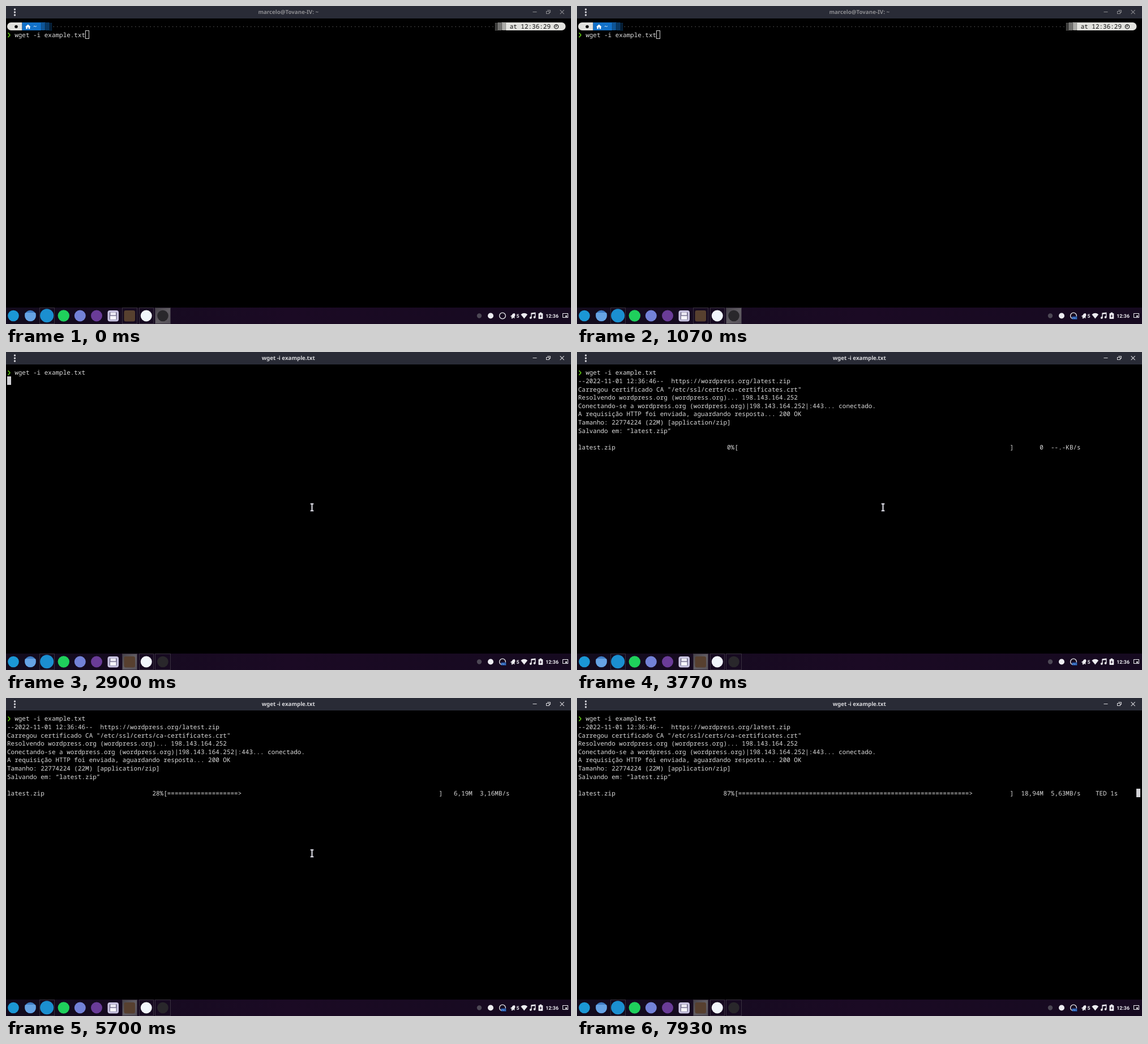
An HTML page with a canvas for the animation above (8 s loop, 998x561 px).

```html
<!DOCTYPE html>
<html lang="pt">
<head>
<meta charset="utf-8">
<title>Terminal</title>
<style>
html, body { margin: 0; width: 100%; height: 100%; overflow: hidden; background: #000; }
canvas { display: block; }
</style>
</head>
<body>
<canvas id="stage" width="998" height="561"></canvas>
<script>
const c = document.getElementById('stage').getContext('2d');
c.textRendering = 'geometricPrecision';
const LOOP = 8000, CELL = 6.575, ROW = 14.65;
const MONO = '10.958px "Noto Sans Mono", monospace';
const INK = '#dcdcdc', PALE = '#e2e2de', BLUE = '#1271c9';
const FOCUS = 1800, ENTER = 2730, SENT = 3770, FIRST = 4200, STEP = 205.8, TOTAL = 21.72;
const SHOW = 1300, HIDE = 6470; // pointer hides after resting

const colX = n => 2 + n * CELL;
const rowTop = n => 28.9 + n * ROW;
const clamp = v => Math.max(0, Math.min(1, v));
const mix = (a, b, k) => a + (b - a) * k;

function rect(x, y, w, h, fill) { c.fillStyle = fill; c.fillRect(x, y, w, h); }
function round(x, y, w, h, r, fill) {
  c.fillStyle = fill; c.beginPath(); c.roundRect(x, y, w, h, r); c.fill();
}
function disc(x, y, r, fill) {
  c.fillStyle = fill; c.beginPath(); c.arc(x, y, r, 0, 7); c.fill();
}
function ring(x, y, r, color, width) {
  c.strokeStyle = color; c.lineWidth = width; c.beginPath(); c.arc(x, y, r, 0, 7); c.stroke();
}
function line(color, width, ...p) {
  c.strokeStyle = color; c.lineWidth = width; c.beginPath();
  for (let i = 0; i < p.length; i += 2) c.lineTo(p[i], p[i + 1]);
  c.stroke();
}
function poly(fill, ...p) {
  c.fillStyle = fill; c.beginPath();
  for (let i = 0; i < p.length; i += 2) c.lineTo(p[i], p[i + 1]);
  c.fill();
}
function label(s, x, y, font, color, align = 'left') {
  c.font = font; c.fillStyle = color; c.textAlign = align; c.fillText(s, x, y);
}
// Monospaced text on the terminal grid
function put(s, col, row, color = INK) {
  [...s].forEach((ch, i) => ch !== ' ' && label(ch, colX(col + i), 40.2 + row * ROW, MONO, color));
}
const putEnd = (s, end, row) => put(s, end - s.length + 1, row);

// Shade cell: level 1 light, 2 medium, 3 dark
function shade(x0, level, color) {
  for (let x = x0; x < x0 + 7; x++) for (let y = 29; y < 43; y++) {
    const even = x % 2 === 0 && y % 2 === 0;
    if (level === 1 ? even : level === 2 ? (x + y) % 2 === 0 : !even) rect(x, y, 1, 1, color);
  }
}

function titleBar(t) {
  rect(0, 0, 998, 22, '#292b36');
  const k = clamp((t - FOCUS) / 200), g = Math.round(mix(140, 216, k));
  const tone = `rgb(${g},${g},${g + 4})`;
  for (const y of [6, 11, 16]) disc(15.5, y, 1.7, '#d4d4da');
  label(t < ENTER ? 'marcelo@Tovane-IV: ~' : 'wget -i example.txt', 498.7, 14.2,
    'bold 9.74px "Noto Sans", sans-serif', tone, 'center');
  line(tone, 1, 930.5, 10.5, 937.5, 10.5);
  c.strokeRect(954.5, 9.5, 5, 4);
  line(tone, 1, 956.5, 8, 956.5, 7.5, 961.5, 7.5, 961.5, 11.5, 960, 11.5);
  line(tone, 1.1, 978.7, 7.2, 985.7, 14.2);
  line(tone, 1.1, 985.7, 7.2, 978.7, 14.2);
}

function promptBar() {
  round(2, 29, 26.5, 14, [7, 0, 0, 7], PALE);
  disc(18, 36.5, 2.8, '#111');
  rect(28.5, 29, 33.5, 14, BLUE);
  poly('#fff', 34, 36.8, 38.8, 32.4, 43.6, 36.8, 42.3, 36.8, 42.3, 40.4, 39.7, 40.4,
    39.7, 37.6, 37.9, 37.6, 37.9, 40.4, 35.3, 40.4, 35.3, 36.8);
  put('~', 7, 0, '#fff');
  [3, 2, 1].forEach((v, i) => shade([62, 69, 75][i], v, BLUE));
  for (let i = 12; i <= 130; i++) rect(colX(i) + 2.7, 35.9, 1.2, 1.2, '#666');
  [1, 2, 3].forEach((v, i) => shade([863, 869, 876][i], v, PALE));
  round(883, 29, 105.5, 14, [0, 7, 7, 0], PALE);
  put('at 12:36:29', 135, 0, '#111');
  ring(972, 36.4, 3.6, '#111', 1.2);
  line('#111', 1, 972, 34, 972, 36.7, 970.3, 36.7);
}

function command(row) {
  const y = 36.7 + row * ROW;
  line('#63d012', 1.5, 3.6, y - 4, 7, y, 3.6, y + 4);
  put('wget -i example.txt', 2, row);
}

// Downloaded megabytes after each refresh, linear between a few points
const curve = [[0, .25], [1, .8], [2, 1.55], [6, 5.02], [12, 12.05], [18, 18.94], [19, 20.1]];
function loaded(n) {
  const i = Math.max(1, curve.findIndex(p => p[0] >= n));
  const [a, b] = [curve[i - 1], curve[i]];
  return mix(a[1], b[1], (n - a[0]) / (b[0] - a[0]));
}
const comma = (v, d) => v.toFixed(d).replace('.', ',');

function progress(t) {
  const n = Math.floor((t - FIRST) / STEP), row = 9;
  put('latest.zip', 0, row);
  put('[', 42, row);
  put(']', 116, row);
  if (n < 0) {
    putEnd('0%', 41, row); putEnd('0', 124, row); put('--.-KB/s', 127, row);
    return;
  }
  const size = loaded(n), part = size / TOTAL, time = .6525 + .187 * n;
  const rate = n <= 12 ? size / time : 4.16 + (n - 12) * .245;
  const width = Math.floor(73 * part);
  putEnd(Math.floor(part * 100) + '%', 41, row);
  if (width) put('='.repeat(width - 1) + '>', 43, row);
  putEnd(size < 1 ? comma(size * 1024, 2) + 'K' : comma(size, 2) + 'M', 124, row);
  putEnd(rate < 1 ? comma(rate * 1024, 0) + 'KB/s' : comma(rate, 2) + 'MB/s', 134, row);
  if (n > 12) put(`TED ${Math.floor(time * (TOTAL - size) / size + .5)}s`, 139, row);
}

const output = [
  [3270, 1, 0, '--2022-11-01 12:36:46--  https://wordpress.org/latest.zip'],
  [3270, 2, 0, 'Carregou certificado CA "/etc/ssl/certs/ca-certificates.crt"'],
  [3270, 3, 0, 'Resolvendo wordpress.org (wordpress.org)... '],
  [3430, 3, 44, '198.143.164.252'],
  [3430, 4, 0, 'Conectando-se a wordpress.org (wordpress.org)|198.143.164.252|:443... '],
  [3630, 4, 70, 'conectado.'],
  [SENT, 5, 0, 'A requisição HTTP foi enviada, aguardando resposta... 200 OK'],
  [SENT, 6, 0, 'Tamanho: 22774224 (22M) [application/zip]'],
  [SENT, 7, 0, 'Salvando em: “latest.zip”']
];

function terminal(t) {
  const block = (col, row) =>
    rect(Math.floor(colX(col)), Math.floor(rowTop(row)), 7, 15, '#d2d2d6');
  if (t < ENTER) {
    promptBar();
    command(1);
    if (t < 1900) {
      c.strokeStyle = '#d2d2d2'; c.lineWidth = 1;
      c.strokeRect(140.5, 43.5, 6, 14);
    } else if (t < 2400) block(21, 1);
    return;
  }
  command(0);
  let at = [0, 1];
  for (const [start, row, col, text] of output) if (t >= start) {
    put(text, col, row);
    at = [col + text.length, row];
  }
  if (t >= SENT) { progress(t); at = [150, 9]; }
  if (t < 3430 || (t >= 3930 && (t - 930) % 1000 < 500)) block(...at);
}

function button(x, w, active) {
  if (active > 0) {
    const g = c.createLinearGradient(x, 532, x + w, 561);
    g.addColorStop(0, '#454149'); g.addColorStop(.5, '#625e64'); g.addColorStop(1, '#544f57');
    c.globalAlpha = active; rect(x, 532, w, 29, g); c.globalAlpha = 1;
  }
  c.strokeStyle = '#38303f'; c.lineWidth = 1;
  c.strokeRect(x + .5, 532.5, w - 1, 28);
}

function taskBar(t) {
  const g = c.createLinearGradient(0, 0, 998, 0);
  g.addColorStop(0, '#120b1d'); g.addColorStop(.5, '#1b0a24'); g.addColorStop(1, '#160a20');
  rect(0, 532, 998, 29, g);
  const k = clamp((t - FOCUS) / 230);
  button(59, 27, 0);
  button(205, 27, k);
  button(235, 26, 0);
  button(263, 28, 1 - k);

  disc(13, 546.5, 9.8, '#1b97d5');
  disc(43, 546.5, 9.8, '#3f7cc4');
  round(33.3, 541, 19.4, 15, [2, 2, 9, 9], '#66a3e4');
  disc(72.2, 546.3, 12, '#1b8fd0');
  disc(101.8, 546.5, 10.2, '#1fd05c');
  disc(130.8, 546.5, 10, '#7382d8');
  disc(160, 546.5, 10, '#6a3c98');
  round(179.5, 537, 19.5, 19.5, 4, '#cbc6e3');
  round(182.5, 540, 13.5, 13.5, 1.5, '#7d7896');
  rect(184.5, 540.5, 9.5, 5, '#eceaf4');
  rect(184, 547, 10.5, 6, '#f6f5fa');
  round(208.5, 537, 19.5, 19.5, 3, '#57402f');
  disc(247.8, 546.5, 10, '#f1f6fb');
  disc(277, 546.5, 9.8, '#29272b');
  tray(t);
}

function tray(t) {
  const w = '#ececf0', font = 'bold 8.9px Roboto, sans-serif';
  disc(836, 546.5, 4.2, '#4d4855');
  disc(856, 546.5, 5, w);
  ring(877, 546.5, 5.4, w, 1.3);
  if (t >= 400) {
    rect(874.5, 547.5, 9, 5.5, '#153f86');
    label('REC', 879, 552.4, 'bold 4.6px Roboto, sans-serif', '#6aa8ff', 'center');
  }
  // bell
  c.save();
  c.translate(896, 546.5); c.rotate(.5);
  poly(w, -4.5, 3, -3, 1, -2.5, -3, 0, -5, 2.5, -3, 3, 1, 4.5, 3);
  disc(0, 4, 1.4, w);
  c.restore();
  label('5', 901.6, 549.8, font, w);
  // wireless
  c.fillStyle = w; c.beginPath(); c.moveTo(915.3, 551.5);
  c.lineTo(909.4, 544.2); c.quadraticCurveTo(915.3, 539.5, 921.2, 544.2); c.fill();
  // music
  line(w, 1.4, 928, 550, 928, 542.2, 934.8, 541.2, 934.8, 549);
  line(w, 2, 928, 543, 934.8, 542);
  disc(926.8, 550, 1.9, w);
  disc(933.6, 549, 1.9, w);
  // battery
  round(940.5, 542, 7.8, 10, 1, w);
  rect(942.7, 540.6, 3.4, 2, w);
  poly('#1b0a24', 945.3, 543.6, 942.4, 547.7, 944.2, 547.7, 943.5, 550.6, 946.4, 546.5, 944.6, 546.5);
  label('12:36', 964.6, 549.8, font, w, 'center');
  c.strokeStyle = w; c.lineWidth = 1;
  c.strokeRect(983.5, 542.5, 9, 7);
  rect(988, 546, 3, 2.5, w);
}

function pointer(t) {
  if (t < SHOW || t >= HIDE) return;
  const k = 1 - (1 - clamp((t - SHOW) / 300)) ** 2;
  const x = mix(552, 540.5, k), y = mix(300, 274, k);
  for (const [color, width, e] of [['#30303a', 3.6, .8], ['#f0f0f4', 1.6, 0]]) {
    line(color, width, x, y - 6, x, y + 6);
    for (const s of [-6, 6]) line(color, width, x - 2.5 - e, y + s, x + 2.5 + e, y + s);
  }
}

function frame(now) {
  const t = now % LOOP;
  rect(0, 0, 998, 561, '#000');
  titleBar(t);
  terminal(t);
  taskBar(t);
  pointer(t);
  requestAnimationFrame(frame);
}
requestAnimationFrame(frame);
</script>
</body>
</html>
```
